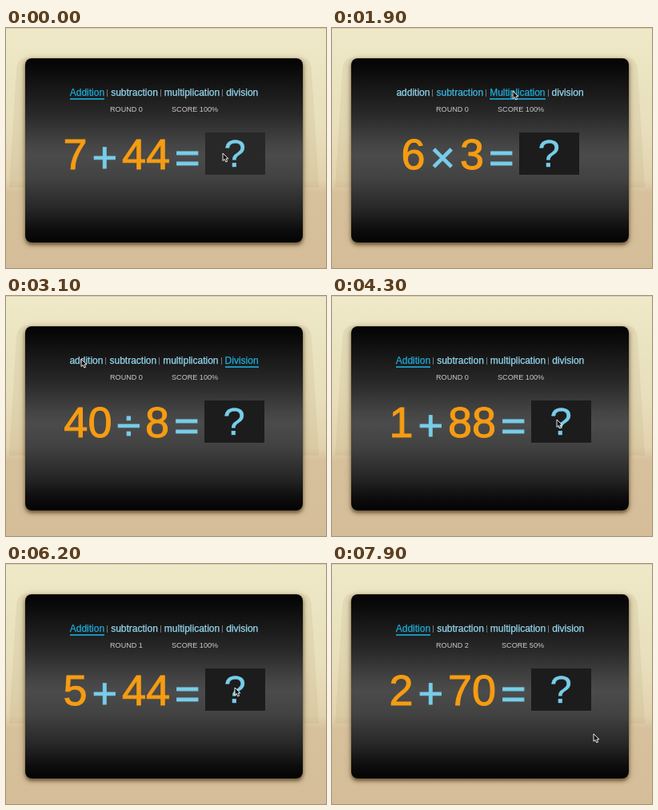
An HTML page for the animation above (8000 ms loop, 400 px wide and 301 px high).

```html
<!DOCTYPE html>
<html lang="en">
<head>
<meta charset="utf-8">
<title>Arithmetic practice</title>
<style>
  html, body { margin: 0; width: 100%; height: 100%; overflow: hidden; }
  body { font-family: "Liberation Sans", Arial, sans-serif; }
  #stage {
    position: relative; width: 400px; height: 301px; overflow: hidden;
    background:
      linear-gradient(#d9d0ad, #d9d0ad) 0 0 / 100% 1px no-repeat,
      linear-gradient(#f0e9c9 0, #ebe4c1 60px, #e8debb 130px, #e2d3ae 190px, #d7c19d 206px, #d4bd98 301px);
  }
  #card {
    position: absolute; left: 24px; top: 38px; width: 347px; height: 231px; border-radius: 8px;
    background: linear-gradient(#030303, #141414 14%, #282828 30%, #454545 47%, #4b4b4b 53%, #424242 65%, #262626 82%, #0d0d0d 93%, #030303);
    box-shadow: 0 3px 4px #5c482acc, 0 1px 9px #7a613877;
  }
  #menu, #sum {
    position: absolute; left: 24px; width: 347px;
    display: flex; justify-content: center; white-space: pre;
  }
  #menu { top: 75px; gap: 8px; font-size: 12px; line-height: 13px; -webkit-text-stroke: .25px; }
  #menu span { position: relative; border-bottom: 2px solid transparent; }
  #menu span + span::before {
    content: ""; position: absolute; left: -5px; top: 2px; width: 1px; height: 9px; background: #77777a;
  }
  .score { position: absolute; top: 97px; font-size: 9.1px; line-height: 11px; color: #cacaca; white-space: pre; }
  #round { left: 130px; }
  #sum { top: 131px; gap: 6px; height: 53px; font-size: 54px; line-height: 53px; }
  #sum span { position: relative; top: 1px; -webkit-text-stroke: 1px; }
  .num { color: #f69c12; }
  #sum .op { top: 5px; color: #78cde9; }
  .answer { color: #f8d820; }
  #sum .ask {
    top: 0; width: 75px; text-align: center; font-size: 49px; color: #78cde9;
    background: #1c1c1c; -webkit-text-stroke: .5px;
  }
  svg { position: absolute; inset: 0; }
  .key { fill: #1c1c1c; stroke: #303030; }
</style>
</head>
<body>
<div id="stage">
  <svg width="400" height="301" viewBox="0 0 400 301">
    <path fill="#8a6c3c" opacity=".09" d="M28 37Q14 37 13 52L4 200H391L382 52Q381 37 367 37Z"/>
  </svg>
  <div id="card"></div>
  <div id="menu"></div>
  <div class="score" id="round"></div>
  <div class="score" id="score"></div>
  <div id="sum"></div>
  <svg width="400" height="301" viewBox="0 0 400 301">
    <g id="keys">
      <rect class="key" x="266.5" y="186.5" width="38" height="50"/>
      <rect class="key" x="315.5" y="186.5" width="32" height="50"/>
      <path fill="#91fb9b" d="M270 211C271 206 277 204 279 209L281 213C285 206 291 198 297 195Q299 194 300 196C293 203 288 212 284 220C282 225 276 226 274 222C272 218 272 214 270 211Z"/>
      <path fill="#f62d12" stroke="#f62d12" stroke-width="1.4" d="M320 200C323 196 326 197 327 201L330 207C333 202 336 197 342 197L343 199C339 202 336 207 334 212C336 217 339 220 342 221C340 225 336 226 333 221L330 216C327 221 324 226 320 225L319 222C323 220 326 216 328 212C325 207 324 203 320 200Z"/>
    </g>
    <g id="pointer">
      <path id="arrow" fill="#111" stroke="#fff" stroke-width=".9" d="M0 0V9.5L2.2 7.5L3.8 11L5.6 10.2L4 6.9H7Z"/>
      <path id="beam" fill="none" stroke="#c4c4c4" d="M-2 -4.5H2M-2 4.5H2M0 -4.5V4.5"/>
    </g>
  </svg>
</div>
<script>
  const LOOP = 8000, FADE = 300;
  const $ = id => document.getElementById(id);
  const modes = ["addition", "subtraction", "multiplication", "division"];

  const scenes = [
    { at: 0, mode: 0, sum: "7 + 44" },
    { at: 950, mode: 1, sum: "9 − 4" },
    { at: 1820, mode: 2, sum: "6 × 3" },
    { at: 2640, mode: 3, sum: "40 ÷ 8" },
    { at: 3350, mode: 0, sum: "1 + 88" },
    { at: 4500, mode: 0, sum: "1 + 88", answer: 89 },
    { at: 5400, mode: 0, sum: "5 + 44", round: 1 },
    { at: 6300, mode: 0, sum: "5 + 44", round: 1, answer: 49 },
    { at: 7200, mode: 0, sum: "2 + 70", round: 2, score: 50 }
  ];

  // Pointer stops: time, x, y
  const stops = [
    [0, 271, 157], [100, 271, 157], [800, 160, 79], [1050, 160, 79],
    [1700, 226, 79], [1950, 226, 79], [2500, 292, 79], [2700, 292, 79],
    [3100, 94, 79], [3550, 94, 79], [4300, 281, 155], [4600, 281, 155],
    [5200, 290, 216], [5500, 290, 216], [6100, 286, 155], [6400, 286, 155],
    [7000, 316, 213], [7150, 327, 213], [LOOP, 327, 213]
  ];

  const mix = (a, b, k) => a + (b - a) * k;
  const ease = k => k * k * (3 - 2 * k);
  const span = (cls, text) => `<span class="${cls}">${text}</span>`;
  const items = modes.map(() => $("menu").appendChild(document.createElement("span")));
  let shown;

  function showScene(scene) {
    const { mode, sum, answer, round = 0, score = 100 } = scene;
    const [a, op, b] = sum.split(" ");
    items.forEach((item, i) => {
      const name = modes[i];
      item.textContent = i === mode ? name[0].toUpperCase() + name.slice(1) : name;
    });
    $("round").textContent = `ROUND ${round}`;
    $("score").textContent = `SCORE ${score}%`;
    $("score").style.left = score === 100 ? "207px" : "212px";
    $("sum").innerHTML = span("num", a) + span("op", op) + span("num", b) + span("op", "=") +
      (answer ? span("answer", answer) : span("ask", "?"));
    $("keys").style.display = answer ? "" : "none";
    shown = scene;
  }

  function paintMenu(scene, previous, t) {
    const left = Math.max(0, 1 - (t - scene.at) / FADE);
    items.forEach((item, i) => {
      const lit = i === scene.mode ? 1 : previous && i === previous.mode ? left : 0;
      item.style.color = `rgb(${mix(150, 30, lit)}, ${mix(217, 174, lit)}, ${mix(240, 220, lit)})`;
      item.style.borderColor = `rgba(30, 174, 220, ${i === scene.mode ? .8 : 0})`;
    });
  }

  function movePointer(scene, t) {
    const i = stops.findIndex(s => s[0] > t);
    const [t0, x0, y0] = stops[i - 1], [t1, x1, y1] = stops[i];
    const k = ease((t - t0) / (t1 - t0));
    const x = mix(x0, x1, k), y = mix(y0, y1, k);
    const typing = scene.answer && y > 186;
    $("pointer").setAttribute("transform", `translate(${x} ${y})`);
    $("arrow").style.display = typing ? "none" : "";
    $("beam").style.display = typing ? "" : "none";
  }

  function render(t) {
    const n = scenes.findLastIndex(s => s.at <= t);
    const scene = scenes[n];
    if (scene !== shown) showScene(scene);
    paintMenu(scene, scenes[n - 1], t);
    movePointer(scene, t);
    if (n === 0) {
      const v = mix(40, 28, Math.min(1, t / FADE));
      $("sum").lastChild.style.background = `rgb(${v}, ${v}, ${v})`;
    }
  }

  const start = performance.now();
  function tick() {
    render((performance.now() - start) % LOOP);
    requestAnimationFrame(tick);
  }
  tick();
</script>
</body>
</html>
```
